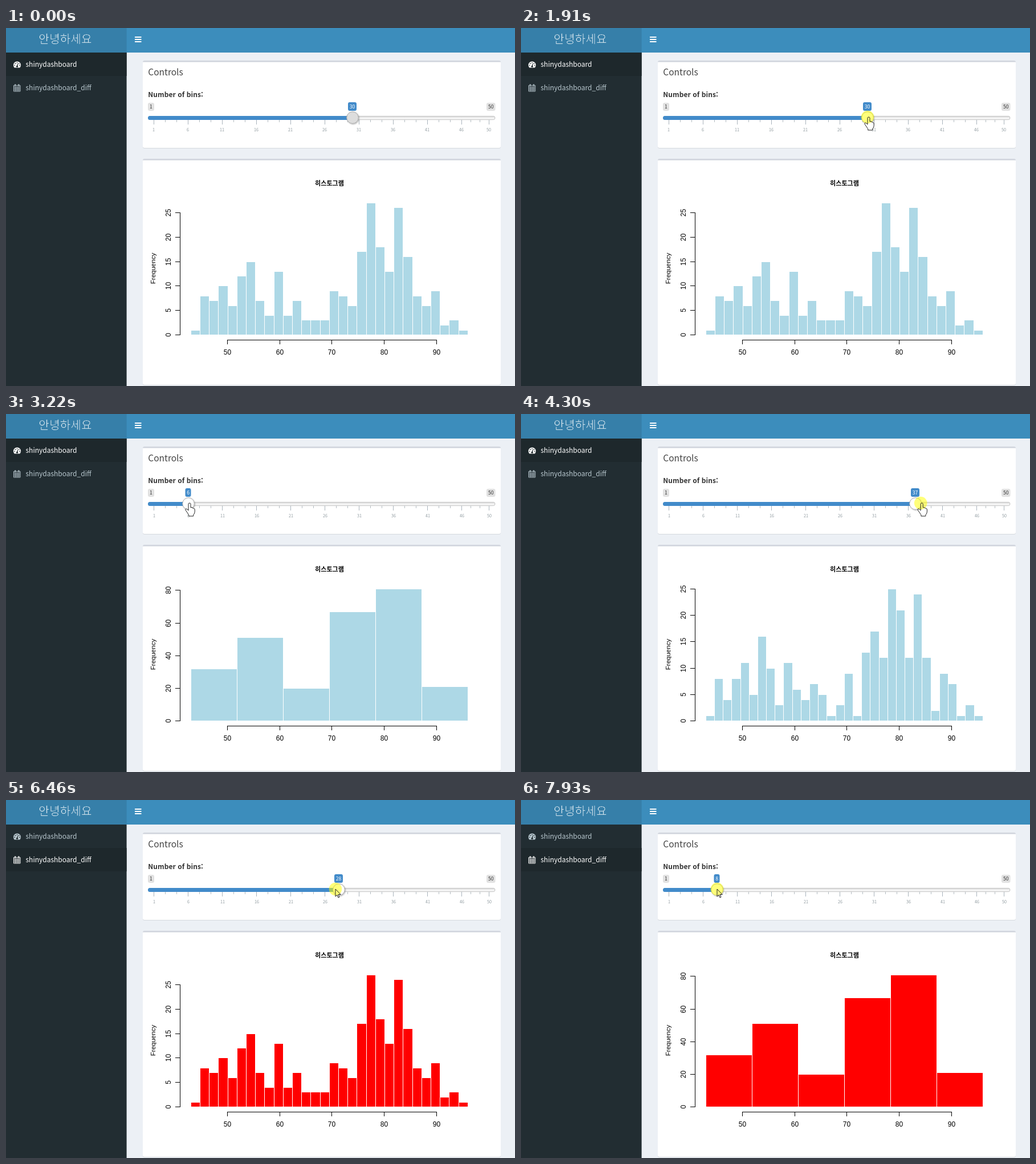
Animation of 893 by 627 pixels, one loop 8 s. Source, as an HTML page:

```html
<!DOCTYPE html>
<html lang="ko">
<head>
<meta charset="utf-8">
<title>Dashboard</title>
<style>
html, body { margin: 0; width: 100%; height: 100%; overflow: hidden; background: #ecf0f5; }
svg { display: block; width: 893px; height: 627px; }
text { font-family: "Noto Sans CJK KR", "Noto Sans", sans-serif; white-space: pre; }
.mid { text-anchor: middle; }
.tiny { font-size: 8.6px; }
.item { font-size: 12px; fill: currentColor; }
.plot text { font: 12px "Liberation Sans", Arial, sans-serif; text-anchor: middle; }
.plot path { fill: none; stroke: #000; }
.plot { shape-rendering: crispEdges; }
</style>
</head>
<body>
<svg viewBox="0 0 893 627">
  <defs>
    <linearGradient id="groove" x2="0" y2="1">
      <stop stop-color="#dedede"/><stop offset="1" stop-color="#fff"/>
    </linearGradient>
    <filter id="drop" x="-50%" y="-50%" width="200%" height="200%">
      <feDropShadow dx="1" dy="1" stdDeviation="1.2" flood-opacity=".3"/>
    </filter>
    <path id="arrow" d="M0 0V13l3-2.8 2 4.8 2-.9-2-4.6h4.2Z"/>
    <path id="hand" transform="translate(2 0)" d="M-2 1.5Q-2 0 0 0T2 1.5V8l1-.5q2-.3 2 1.2 2-.5 2.2 1 2-.3 2 1.5v4q0 3-2.5 5.5v2.2h-8v-2.2L-6.5 13q-1.5-2 0-2.8 1.4-.5 3 1.3l1.5 1.5Z"/>
  </defs>

  <rect width="893" height="627" fill="#ecf0f5"/>
  <rect y="43" width="211.6" height="584" fill="#222d32"/>
  <rect id="row0" y="43" width="211.6" height="41" fill="#1e282c"/>
  <rect id="row1" y="84" width="211.6" height="41" fill="#1e282c"/>
  <rect width="893" height="43" fill="#3c8dbc"/>
  <rect width="211.6" height="43" fill="#367fa9"/>
  <!-- a stroke in the background colour thins the letters -->
  <text class="mid" x="104" y="26.5" font-size="20.3" fill="#fff" stroke="#367fa9" stroke-width=".7">안녕하세요</text>
  <path d="M226 16h11.5M226 20h11.5M226 24h11.5" stroke="#fff" stroke-width="2"/>

  <g id="item0" class="item">
    <path d="M14.6 69.5A6.6 6.6 0 1 1 24.4 69.5Z"/>
    <g fill="#1e282c"><circle cx="19.5" cy="67.3" r="1.6"/><g id="dial"></g></g>
    <path d="M19.5 67l1.2-4" stroke="#1e282c" stroke-width="1.2"/>
    <text x="34.5" y="68.4">shinydashboard</text>
  </g>
  <g id="item1" class="item">
    <path d="M13.5 100.5h11.5v10.5h-11.5ZM13.5 103h11.5m0 2.7h-11.5m0 2.7h11.5M16.4 103v8m2.9 0v-8m2.9 0v8" fill="none" stroke="currentColor" stroke-width=".9"/>
    <path d="M15.2 98.5h2v3h-2ZM21.3 98.5h2v3h-2Z"/>
    <text x="34.5" y="109.4">shinydashboard_diff</text>
  </g>

  <g id="boxes"></g>
  <text x="249.3" y="83.4" font-size="15.5" fill="#444">Controls</text>
  <text x="249.3" y="121.2" font-size="12" font-weight="700" fill="#333" letter-spacing=".06">Number of bins:</text>

  <g fill="#e1e1e1">
    <rect x="249" y="131" width="11" height="14" rx="3"/>
    <rect x="843" y="131" width="15.5" height="14" rx="3"/>
  </g>
  <g class="mid tiny" fill="#333">
    <text x="254.4" y="141.2">1</text><text x="850.8" y="141.2">50</text>
  </g>
  <g id="grid"></g>
  <rect x="249.5" y="154.5" width="608.5" height="6" rx="3" fill="url(#groove)" stroke="#bbb" stroke-width=".9"/>
  <rect id="fill" x="249" y="154" height="7" rx="3.5" fill="#428bca"/>
  <g id="knob">
    <rect id="tag" y="130" height="15" rx="3" fill="#428bca"/>
    <text id="num" class="mid tiny" x="-.4" y="141.2" fill="#fff"></text>
    <circle id="ball" cy="157" r="10.3" stroke="#aaa" filter="url(#drop)"/>
  </g>

  <text class="mid" x="567.5" y="276.2" font-size="11.1" font-weight="700">히스토그램</text>
  <g class="plot">
    <g id="bars" stroke="#fff"></g>
    <g id="yAxis"></g>
    <g id="xAxis"></g>
    <text style="font-size:11.5px" transform="translate(261.5 421)rotate(-90)">Frequency</text>
  </g>

  <g id="mouse">
    <use id="body" fill="#fff"/>
    <circle id="halo" r="11.3" fill="#ff0" fill-opacity=".52"/>
    <use id="outline" fill="none" stroke="#222"/>
  </g>
</svg>
<script>
const LOOP = 8000, TAB = 5290, FIRST = 30;
const $ = id => document.getElementById(id);
const set = (id, attrs) => { for (const k in attrs) $(id).setAttribute(k, attrs[k]); };
const show = (id, on) => set(id, { visibility: on ? 'inherit' : 'hidden' });
const mix = (a, b, p) => a + (b - a) * p;
const knobX = v => 248 + 12 * v;

// The plotted sample: how often each waiting time from 43 to 96 minutes occurs
const MIN = 43, MAX = 96;
const counts = [1,0,3,5,4,3,5,5,6,5,7,9,6,4,3,4,7,6,0,4,3,4,3,2,1,1,2,
  4,5,1,7,6,8,9,12,15,10,8,13,12,14,10,6,6,2,6,3,6,1,1,2,1,0,1];

// Either the pointer moves on an arc, or it drags the slider to a value
const move = (start, end, via, to) => ({ start, end, via, to });
const drag = (start, end, value) => ({ start, end, value });
const steps = [
  move(210, 980, [205, -85], [122, 76]),
  move(1060, 1840, [760, 110], [608, 156]),
  drag(1910, 2380, 21),
  drag(2530, 2900, 6),
  drag(3220, 3760, 32),
  drag(3910, 4450, 43),
  move(4600, 5360, [-296, 104], [237, 121]),
  move(5590, 6370, [790, 175], [608, 156]),
  drag(6370, 6600, 14),
  drag(6850, 7230, 6),
  drag(7380, 7930, 8)
];

function pose(t) {
  let v = FIRST, n = FIRST, x = 360, y = 527;
  for (const s of steps) {
    if (t < s.start) break;
    n = v;  // the plot catches up when the next step begins
    const p = Math.min(1, (t - s.start) / (s.end - s.start));
    if (s.to) {
      const arc = (a, i) => mix(mix(a, s.via[i], p), mix(s.via[i], s.to[i], p), p);
      x = arc(x, 0);
      y = arc(y, 1);
    } else {
      x = knobX(mix(v, s.value, p ** 2));
      v = mix(v, s.value, p ** 2.4);  // the knob trails the pointer
    }
    if (t >= TAB && s.start < TAB) v = n = FIRST;
  }
  return { v: Math.round(v), n, x, y };
}

function histogram(n) {
  const bins = Array(n).fill(0);
  counts.forEach((c, i) => {
    bins[Math.max(0, Math.ceil(i * n / (MAX - MIN) - 1e-9) - 1)] += c;
  });
  return bins;
}

// Axis step chosen the way R's pretty() does
function niceStep(max) {
  const cell = max / 5, base = 10 ** Math.floor(Math.log10(cell));
  let unit = base;
  if (2 * base - cell < 1.5 * (cell - unit)) unit = 2 * base;
  if (5 * base - cell < 2.75 * (cell - unit)) unit = 5 * base;
  if (10 * base - cell < 1.5 * (cell - unit)) unit = 10 * base;
  return unit;
}

const plotX = w => Math.round(323.8 + (w - MIN) * 9.17) + .5;

function drawPlot(n, color) {
  const bins = histogram(n), top = Math.max(...bins);
  const y = c => Math.round(537.2 - c / top * 231.6) + .5;
  const x = i => plotX(MIN + i * (MAX - MIN) / n);
  set('bars', { fill: color });
  $('bars').innerHTML = bins.map((c, i) => c ?
    `<rect x="${x(i)}" y="${y(c)}" width="${x(i + 1) - x(i)}" height="${y(0) - y(c)}"/>` : '').join('');
  let d = '', labels = '', last = 0;
  for (let v = 0, s = niceStep(top); v <= top; v += s) {
    d += `M297 ${y(v)}h8`;
    labels += `<text transform="translate(289 ${y(v)})rotate(-90)">${v}</text>`;
    last = v;
  }
  $('yAxis').innerHTML = `<path d="${d}M305.5 538V${y(last) - .5}"/>` + labels;
}

function buildStatic() {
  $('boxes').innerHTML = [[57, 153], [229, 396]].map(([y, h]) =>
    `<rect x="240" y="${y + 1}" width="628" height="${h}" rx="3" fill="#d5d9de"/>
     <rect x="240" y="${y}" width="628" height="${h}" rx="3" fill="#d2d6de"/>
     <path d="M240 ${y + 2.7}h628v${h - 5.7}q0 3-3 3h-622q-3 0-3-3Z" fill="#fff"/>`).join('');

  let dots = '';
  for (let i = 0; i < 5; i++) {
    const a = Math.PI * i / 4;
    dots += `<circle cx="${19.5 - 4.5 * Math.cos(a)}" cy="${65.3 - 4.4 * Math.sin(a)}" r=".85"/>`;
  }
  $('dial').innerHTML = dots;

  let ticks = '', minor = '', values = '';
  for (let v = 1; v <= 51; v += 5) {
    const mark = Math.min(v, 50), x = knobX(mark) - .5;
    const gap = (knobX(Math.min(v + 5, 50)) - knobX(mark)) / 3;
    ticks += `M${x} 161v8`;
    if (gap) minor += `M${x + gap} 161v4M${x + 2 * gap} 161v4`;
    values += `<text x="${x + .5}" y="180.8">${mark}</text>`;
  }
  $('grid').innerHTML = `<path d="${ticks}" stroke="#aab4bc"/><path d="${minor}" stroke="#b4bcc2"/>
    <g id="marks" class="mid" font-size="7.2" fill="#8f9a9f">${values}</g>`;

  let d = 'M388 546.5H756', labels = '';
  for (let w = 50; w <= 90; w += 10) {
    d += `M${plotX(w)} 546v8`;
    labels += `<text x="${plotX(w)}" y="572">${w}</text>`;
  }
  $('xAxis').innerHTML = `<path d="${d}"/>` + labels;
}

let plotKey = '';

function draw(t) {
  const second = t >= TAB, present = t >= 210;
  const { v, n, x: mx, y: my } = pose(t);
  const x = knobX(v);

  const key = n + '/' + second;
  if (key !== plotKey) drawPlot(n, second ? '#f00' : '#add8e6');
  plotKey = key;

  for (const row of [0, 1]) {
    const top = 43 + 41 * row;
    const over = present && mx < 212 && my >= top && my < top + 41;
    const lit = over || row === +second;
    show('row' + row, lit);
    set('item' + row, { color: lit ? '#fff' : '#b8c7ce' });
  }

  const w = v > 9 ? 15 : 10;
  set('fill', { width: x - 249 });
  set('knob', { transform: `translate(${x} 0)` });
  set('tag', { x: -w / 2 - .5, width: w });
  $('num').textContent = v;
  const hot = present && Math.hypot(mx - x, my - 157) < 11;
  set('ball', { fill: hot ? '#fff' : '#ddd' });
  set('marks', { transform: `translate(${t < 1980 ? -1 : 0} 0)` });

  const shape = t >= 1780 && t < 4640 ? '#hand' : '#arrow';
  const still = (t >= 2900 && t < 3290) || (t >= 5440 && t < 5590);
  set('body', { href: shape });
  set('outline', { href: shape });
  show('mouse', present);
  show('halo', !still);
  set('mouse', { transform: `translate(${mx} ${my})` });
}

buildStatic();
const start = performance.now();
function tick() {
  draw((performance.now() - start) % LOOP);
  requestAnimationFrame(tick);
}
tick();
</script>
</body>
</html>
```
